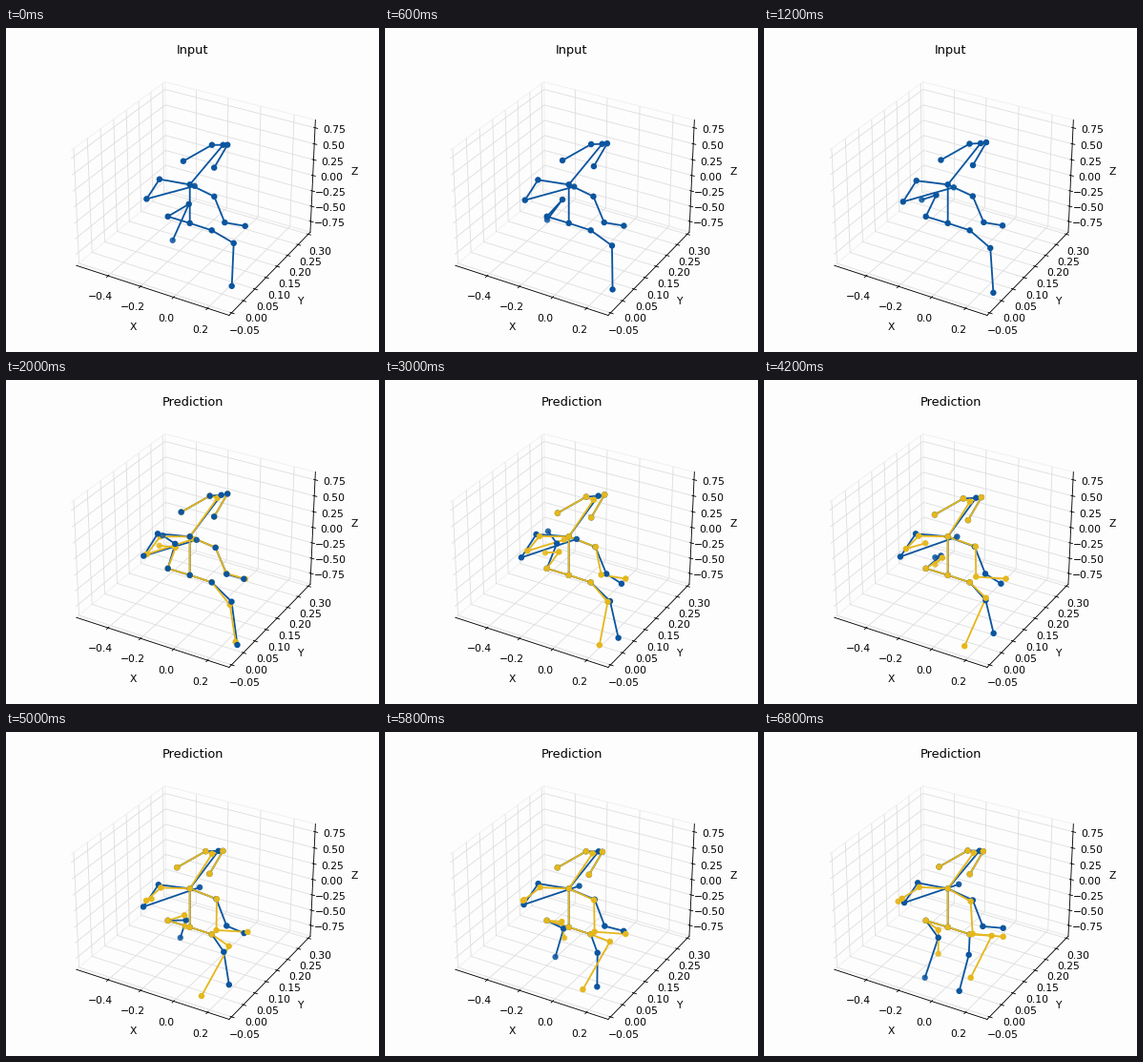
Write a matplotlib script that moves like this. It is 391 px wide and 340 px high and loops after 7 s.

```python
import numpy as np
import matplotlib.pyplot as plt
from matplotlib.animation import FuncAnimation

W, H, DPI = 391, 340, 77
FRAMES, STEP_MS, SPLIT = 35, 200, 10
LAST = FRAMES - 1
SWAY_PERIOD = 40  # in frames
BLUE, GOLD, PAPER = "#0b559f", "#e5b71c", "#fdfdfd"


def sway(x, y, dx, dy):
    """Slow swing about (x, y); dx and dy hold cosine and sine amplitudes."""
    def at(t):
        w = 2 * np.pi * t / SWAY_PERIOD
        wave = np.array([np.cos(w), np.sin(w)])
        return np.array([x + wave @ dx, y + wave @ dy])
    return at


def path(*points, start=0):
    """Smooth curve through evenly timed points, from start to the last frame."""
    p = np.array(points, float)
    slope = np.gradient(p, axis=0)

    def at(t):
        u = (t - start) / (LAST - start) * (len(p) - 1)
        i = min(int(u), len(p) - 2)
        s = u - i
        ease = s * s * (3 - 2 * s)
        return (p[i] + ease * (p[i + 1] - p[i])
                + s * (1 - s) * ((1 - s) * slope[i] - s * slope[i + 1]))
    return at


def ahead(*points):
    return path(*points, start=SPLIT)


def still(x, y):
    return lambda t: np.array([x, y])


def right_face(x, y):
    return sway(x - 3.2, y + 0.6, (3.4, 1.2), (-0.7, -1.8))


def left_face(x, y):
    return sway(x - 1.5, y - 0.2, (2, 2), (0, -3.2))


shared = dict(
    neck=still(193, 164.5), mid=still(193, 205),
    r_hip=still(170, 198), l_hip=still(216, 212.5),
    r_eye=right_face(216, 123), r_ear=right_face(186, 140),
    l_eye=left_face(232, 123), l_ear=left_face(218, 147))

truth = dict(
    shared,
    nose=sway(225.3, 123.2, (2.6, 0.7), (-0.3, -2.3)),
    r_shoulder=sway(160.2, 160.3, (1, -0.9), (-1.4, 1.2)),
    r_elbow=sway(145.4, 182.8, (2.3, -0.8), (-3.2, 2)),
    l_shoulder=sway(219.9, 176.1, (-1.3, 0), (1, 0)),
    l_elbow=sway(231, 203.9, (-1.4, 0.6), (0.4, 0)),
    r_wrist=path((198, 166), (200.3, 168), (203, 164), (204.5, 160)),
    l_wrist=path((251, 208), (250, 208), (248, 215), (250, 211), (251, 206)),
    r_knee=path((192, 185), (178, 173), (182, 174), (189, 199), (183, 216)),
    r_ankle=path((175, 223), (164, 168), (174, 163), (183, 219), (169, 258)),
    l_knee=path((239, 226), (237, 232.5), (235.5, 232), (228, 231), (215, 234)),
    l_ankle=path((237, 271), (242, 279), (244.5, 268.5), (233, 265.5), (205, 272)))

forecast = dict(
    shared,
    nose=ahead((222, 124), (216, 128), (220, 127)),
    r_shoulder=ahead((162, 164.5), (163, 163)),
    r_elbow=ahead((148, 183), (150, 178), (147, 177), (145, 175)),
    l_shoulder=ahead((220, 176), (222, 175), (217, 178)),
    l_elbow=ahead((231, 203), (222, 207), (219, 212)),
    r_wrist=ahead((197, 167), (181, 169), (150, 176), (141, 178)),
    l_wrist=ahead((251, 209), (254, 209), (251, 215)),
    r_knee=ahead((178, 176), (187.5, 188), (183, 208)),
    r_ankle=ahead((161, 174), (173, 187), (189, 207), (183, 233)),
    l_knee=ahead((235, 236), (233, 228), (239, 214)),
    l_ankle=ahead((241, 275), (217, 279.5), (205, 276), (217, 258)))

LIMBS = [("r_ear", "r_eye", "nose", "l_eye", "l_ear"),
         ("nose", "neck", "mid"),
         ("r_wrist", "r_elbow", "r_shoulder", "neck",
          "l_shoulder", "l_elbow", "l_wrist"),
         ("r_ankle", "r_knee", "r_hip", "mid", "l_hip", "l_knee", "l_ankle")]
FAR = {"r_ankle": 0.75, "r_wrist": 0.88}  # fainter dots further from the viewer

plt.rcParams["font.family"] = "DejaVu Sans"
plt.rcParams["grid.color"] = "#dedede"

# the tiny surplus keeps the pixel size from rounding down
fig = plt.figure(figsize=((W + 1e-6) / DPI, (H + 1e-6) / DPI), dpi=DPI, facecolor=PAPER)

SIDE, LEFT, BOTTOM = 285, 52.3, 319.5
box = fig.add_axes([LEFT / W, 1 - BOTTOM / H, SIDE / W, SIDE / H], projection="3d")
box.set_facecolor("none")
box.set(xlim=(-0.6, 0.325), ylim=(-0.06, 0.31), zlim=(-0.93, 0.87))
box.set_xlabel("X", labelpad=5)
box.set_ylabel("Y", labelpad=5)
box.set_zlabel("Z")
box.set_xticks(np.arange(-2, 2) * 0.2)
box.set_yticks(np.arange(-1, 7) * 0.05)
box.set_zticks(np.arange(-3, 4) * 0.25)
for axis in (box.xaxis, box.yaxis, box.zaxis):
    axis.pane.set_facecolor("none")
    axis.pane.set_edgecolor("#e6e6e6")

title = fig.text(0.5, 1 - 27 / H, "Input", size=12, ha="center", va="baseline")

stage = fig.add_axes([0, 0, 1, 1], zorder=5)
stage.set(xlim=(0.3, W + 0.3), ylim=(H + 0.2, 0.2))
stage.axis("off")


class Skeleton:
    def __init__(self, joints, color, order):
        self.joints = joints
        self.bones = [stage.plot([], [], color=color, lw=1.7, zorder=order)[0]
                      for _ in LIMBS]
        alphas = [FAR.get(name, 1) for name in joints]
        zeros = np.zeros(len(joints))
        self.dots = stage.scatter(zeros, zeros, s=21, c=color, lw=1.4,
                                  alpha=alphas, zorder=order + 2)

    def pose(self, t):
        spots = {name: place(t) for name, place in self.joints.items()}
        for bone, limb in zip(self.bones, LIMBS):
            bone.set_data(*np.array([spots[name] for name in limb]).T)
        self.dots.set_offsets(list(spots.values()))

    def show(self, on):
        for part in (*self.bones, self.dots):
            part.set_visible(on)


actual = Skeleton(truth, BLUE, 1)
predicted = Skeleton(forecast, GOLD, 2)


def draw(i):
    predicting = i >= SPLIT
    title.set_text("Prediction" if predicting else "Input")
    actual.pose(i)
    actual.dots.set_zorder(5 if i < SPLIT + 3 else 3)
    predicted.show(predicting)
    if predicting:
        predicted.pose(i)
    return []


anim = FuncAnimation(fig, draw, frames=FRAMES, interval=STEP_MS,
                     init_func=lambda: [], repeat=True, repeat_delay=0, blit=False)
plt.show()
```
